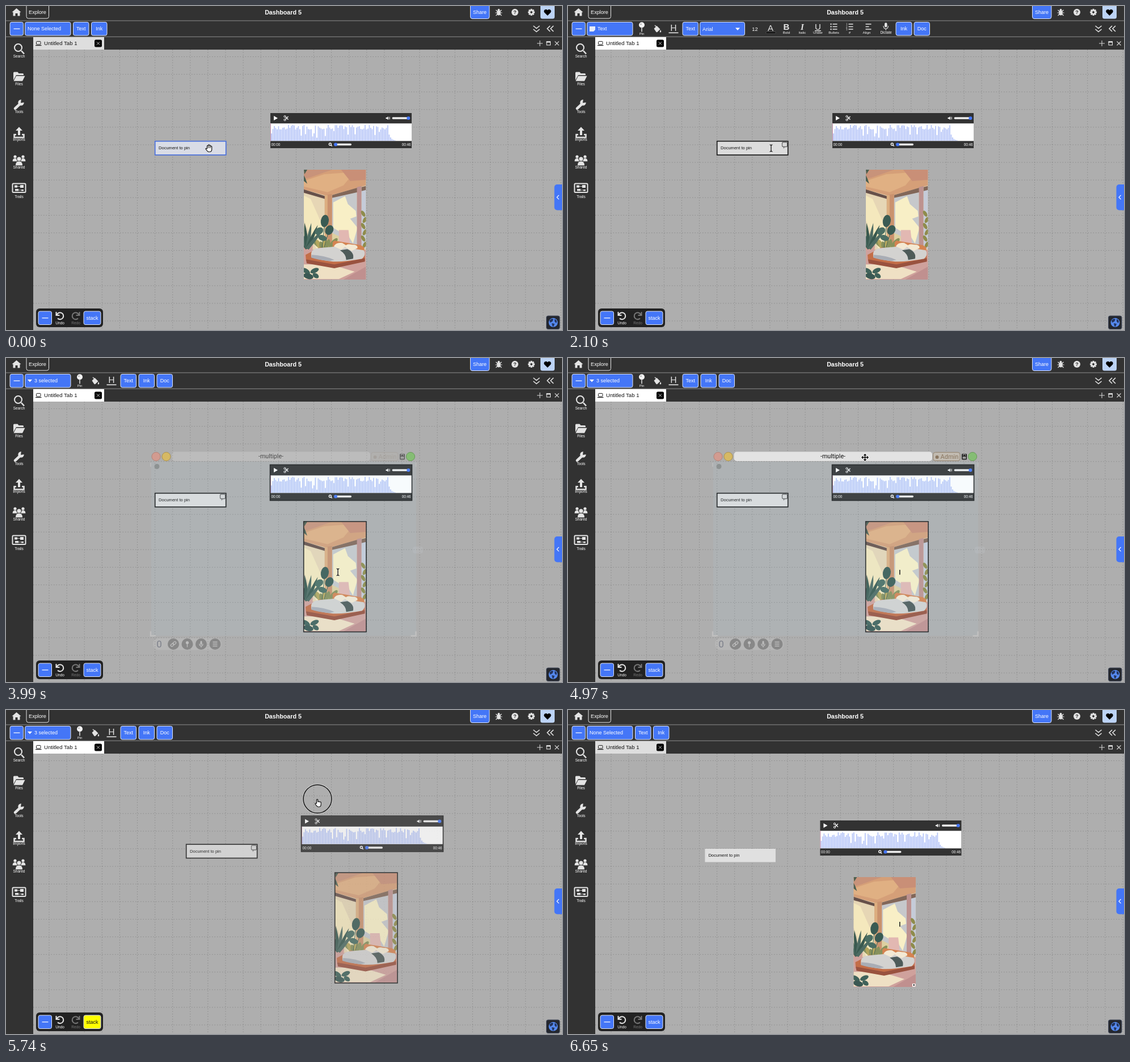
Recreate the animation shown at these times as an HTML page. Size 980 px wide and 572 px high, loop 6.79 s.

```html
<!DOCTYPE html>
<html lang="en">
<head>
<meta charset="utf-8">
<title>Dashboard</title>
<style>
html, body { margin: 0; width: 100%; height: 100%; overflow: hidden; background: #323232; }
svg { display: block; width: 980px; height: 572px; font-family: "Liberation Sans", Arial, sans-serif; }
#frame { font-family: Roboto, Arial, sans-serif; }
</style>
</head>
<body>
<svg id="stage" viewBox="0 0 980 572" xmlns="http://www.w3.org/2000/svg"></svg>
<script>
const LOOP = 6790, STEP = 70;
const DARK = '#323232', BLUE = '#4476f7', LIGHT = '#e4e4e4';

// Drawing helpers
const rect = (x, y, w, h, fill, more = '') => `<rect x="${x}" y="${y}" width="${w}" height="${h}" fill="${fill}" ${more}/>`;
const disc = (x, y, r, fill, more = '') => `<circle cx="${x}" cy="${y}" r="${r}" fill="${fill}" ${more}/>`;
const fillPath = (d, fill, more = '') => `<path d="${d}" fill="${fill}" ${more}/>`;
const line = (d, color, w = 1, more = '') => `<path d="${d}" fill="none" stroke="${color}" stroke-width="${w}" ${more}/>`;
const poly = (pts, fill) => `<polygon points="${pts}" fill="${fill}"/>`;
const oval = (x, y, rx, ry, turn, fill) => `<ellipse rx="${rx}" ry="${ry}" fill="${fill}" transform="translate(${x} ${y}) rotate(${turn})"/>`;
const text = (x, y, size, str, fill = LIGHT, more = '') => `<text x="${x}" y="${y}" font-size="${size}" fill="${fill}" ${more}>${str}</text>`;
const label = (x, y, str, fill = LIGHT, size = 6.5) => text(x, y, size, str, fill, 'text-anchor="middle"');
const group = (id, body) => `<g id="${id}">${body}</g>`;
const at = (x, y, body) => `<g transform="translate(${x} ${y})">${body}</g>`;
const button = (x, y, w, h, str, fill = BLUE, color = '#fff') =>
  rect(x + .5, y + .5, w - 1, h - 1, fill, 'rx="3" stroke="#dfe5f5"') + label(x + w / 2, y + h / 2 + 3.2, str, color, 9);
const minus = (x, y) => button(x, y, 24.5, 24.5, '') + rect(x + 7, y + 11.7, 11, 1.2, '#fff');
const caret = (x, y) => fillPath(`M${x - 4} ${y - 2}h8l-4 4.5z`, '#fff');
const noise = n => { const v = Math.sin(n * 127.1 + 7.3) * 43758.5; return v - Math.floor(v); };

function grid() {
  let d = '';
  for (let x = 76; x < 980; x += 31.1) d += `M${x.toFixed(1)} 77V572`;
  for (let y = 89.5; y < 572; y += 31.1) d += `M48 ${y.toFixed(1)}H980`;
  return rect(48, 77, 932, 495, '#aeaeae') + line(d, '#000', 1, 'stroke-dasharray="1.5 3" opacity=".2"');
}

function header() {
  const gear = [0, 45, 90, 135].map(a => rect(-1.5, -6, 3, 12, LIGHT, `transform="rotate(${a})"`)).join('');
  return rect(0, 0, 980, 77, DARK) + rect(0, 25.5, 980, 1, '#8d8d8d') + rect(0, 53.8, 980, 1, '#8d8d8d') +
    fillPath('M18.5 4l8 7h-2v6.5h-4v-4.5h-4v4.5h-4v-6.5h-2z', LIGHT) +
    rect(36, -4, 39.5, 26, DARK, 'rx="3.5" stroke="#e8e8e8"') + label(55.5, 13.7, 'Explore', '#fff', 9.1) +
    text(488.5, 14.5, 10.7, 'Dashboard 5', '#fff', 'text-anchor="middle" font-weight="bold"') +
    rect(818.5, -4, 33.5, 26.5, BLUE, 'rx="3.5" stroke="#dfe5f5"') + label(835, 13.7, 'Share', '#fff', 9) +
    at(868.5, 11, oval(0, 1, 3.2, 4.6, 0, LIGHT) + disc(0, -4, 2, LIGHT) +
      line('M-6 1H6M-5-4L-2-1M5-4L2-1M-5 6L-2 3M5 6L2 3', LIGHT, 1.2)) +
    disc(897, 11, 6, LIGHT) + text(897, 14.3, 9, '?', DARK, 'text-anchor="middle" font-weight="bold"') +
    at(926, 11, gear + disc(0, 0, 4.3, LIGHT) + disc(0, 0, 1.9, DARK)) +
    rect(942, -4, 25, 26.5, '#bcd3f5', 'rx="3.5"') +
    fillPath('M954.5 17l-5.3-5.3c-3-3.5 2-8 5.3-4.2c3.3-3.8 8.3.7 5.3 4.2z', '#000') +
    line('M929.5 35l5.5 4.5 5.5-4.5M929.5 41l5.5 4.5 5.5-4.5M959 35l-5 5 5 5M965 35l-5 5 5 5', LIGHT, 1.6);
}

function tabs() {
  return '<rect id="tab" x="48" y="55" width="125" height="22"/>' +
    rect(53.5, 62.5, 7.5, 5.5, 'none', 'stroke="#222" rx="1"') + rect(52, 69, 10.5, 1.2, '#222') +
    text(67, 69.3, 9.6, 'Untitled Tab 1', '#111') +
    rect(156, 59.5, 13, 13, '#050505', 'rx="2.5"') + line('M160 63.5l5 5m0-5l-5 5', '#ddd', .9) +
    line('M936 66h10M941 61v10M967.5 62.5l7 7m0-7l-7 7', '#d5d5d5', 1.1) +
    rect(953, 63, 6.5, 6, 'none', 'stroke="#f0f0f0"') + rect(952.5, 62.5, 7.5, 2, '#f0f0f0');
}

function sidebar() {
  const person = (x, y, r) => disc(x, y, r, LIGHT) +
    fillPath(`M${x - r * 1.7} ${y + r * 3.2}q0-${r * 2} ${r * 1.7}-${r * 2}t${r * 1.7} ${r * 2}z`, LIGHT);
  const names = [['Search', 90.5], ['Files', 139.5], ['Tools', 189], ['Imports', 238], ['Shared', 287], ['Trails', 339]];
  return rect(0, 55, 48, 517, DARK) +
    line('M27 79l5 5.5', LIGHT, 2.5) + disc(21.5, 73.5, 6.5, 'none', `stroke="${LIGHT}" stroke-width="2.1"`) +
    fillPath('M13 131V118q0-1.5 1.5-1.5h6l2 2.5h7q1.5 0 1.5 1.5v1.5H18z', LIGHT) +
    fillPath('M13.5 132.5l4.5-9h15.5l-4.5 9z', LIGHT) +
    line('M16 181l9-8.5', LIGHT, 4.5, 'stroke-linecap="round"') + disc(26.5, 170.5, 5.2, LIGHT) + fillPath('M26 171l1-7 6 0 1 6z', DARK) +
    fillPath('M23 213.5l6 6.5h-4v8h-4v-8h-4z', LIGHT) + line('M18 227H14.5v5h17v-5H28', LIGHT, 2.5) +
    person(16, 266, 2.6) + person(30, 266, 2.6) + disc(23, 270, 4.7, DARK) + person(23, 270, 3.6) +
    rect(11.5, 313.5, 23, 15.5, 'none', `rx="1.5" stroke="${LIGHT}" stroke-width="2"`) +
    rect(15, 316.5, 5, 4, LIGHT) + rect(25, 316, 6, 5, LIGHT) + rect(16, 323, 6, 3.5, LIGHT) + rect(27, 324, 4, 2.5, LIGHT) +
    line('M20 318.5h5M22 325h5', LIGHT, .8) +
    names.map(([n, y]) => label(23, y, n, '#fff')).join('');
}

function dock() {
  const turn = 'M-5.5-1A6 6 0 1 1-4 5M-6.5-6.5v6h6';
  return rect(53, 534, 118, 33, '#222', 'rx="6"') + minus(56.5, 538.5) +
    at(95, 546.5, line(turn, LIGHT, 2)) + label(95, 561.5, 'Undo', '#fff') +
    at(123, 546.5, line(turn, '#777', 2, 'transform="scale(-1 1)"')) + label(123, 561.5, 'Redo', '#777') +
    group('stackOff', button(136.5, 538.5, 31, 24.5, 'stack')) +
    group('stackOn', button(136.5, 538.5, 31, 24.5, 'stack', '#ffff00', '#111')) +
    rect(966.5, 315, 20, 45.5, BLUE, 'rx="5"') + line('M974.5 334l-3.5 3.7 3.5 3.7', '#fff', 1.2) +
    rect(952.5, 547, 23.5, 23.5, '#24272e', 'rx="3" stroke="#4b5263"') + disc(964.5, 558.8, 8, '#5589ee') +
    fillPath('M958 555l4-3 3 1-2 4-4 2zM962 560l5 1-2 5-2-1zM967 552l4 4-1 4-3-3z', '#24345c');
}

function toolbars() {
  const field = str => button(33, 28, 81.5, 24.5, '') + str;
  const common = at(130, 33.5, disc(0, 0, 5, '#f4f4f4') + disc(-1.5, -1.5, 1.3, '#aaa') + rect(-.8, 5, 1.6, 7, '#ddd')) + label(130, 51, 'Pin', '#fff', 6) +
    at(157, 40, fillPath('M-5.5 0l5-5 6 6-5 5q-1 .7-2 0z', LIGHT) + line('M-4-6l4 4', LIGHT, 1.3) + fillPath('M6 2q2.5 4 0 4.5t0-4.5z', LIGHT)) +
    text(186, 44, 15, 'H', LIGHT, 'text-anchor="middle" font-family="Lato, sans-serif"') + rect(177.5, 46.5, 17, 1.6, LIGHT) +
    button(201.5, 28, 28.5, 24.5, 'Text');
  const glyph = (x, ch, name, more) => text(x, 42, 15, ch, LIGHT, 'text-anchor="middle" ' + more) + label(x, 48.5, name, '#fff', 6.2);
  const rows = (x, name, widths, marks = '') =>
    line(widths.map((w, i) => `M${x - 2} ${32 + i * 4.5}h${w}`).join(''), LIGHT, 1.5) + marks + label(x, 48.5, name, '#fff', 6.2);
  const textTools = field(fillPath('M38 36h10v6l-3 3H38z', '#e8ecf8') + text(52, 43.2, 9, 'Text', '#fff')) + common +
    button(232, 28, 80, 24.5, '') + text(237, 43.7, 9.3, 'Arial', '#fff') + caret(299, 40.5) +
    label(329.5, 43.5, '12', '#fff', 9.3) + label(357, 44, 'A', LIGHT, 15) + rect(349, 46, 17, 2.6, '#000', 'stroke="#777" stroke-width=".5"') +
    glyph(385, 'B', 'Bold', 'font-weight="bold"') +
    glyph(413, 'I', 'Italic', 'font-style="italic" font-weight="bold" font-family="Liberation Serif, serif"') +
    glyph(440.5, 'U', 'Under', 'text-decoration="underline"') +
    rows(468.5, 'Bullets', [8, 8, 8], [32, 36.5, 41].map(y => disc(463.5, y, 1.2, LIGHT)).join('')) +
    rows(496.5, '#', [8, 8, 8], [1, 2, 3].map(n => text(490, 29.5 + n * 4.5, 4.5, n)).join('')) +
    rows(526.5, 'Align', [10, 6, 10]) +
    rect(558, 29.5, 4.5, 8, LIGHT, 'rx="2.2"') + line('M556 35q0 5 4.2 5t4.2-5M560.2 40v3', LIGHT, 1.1) + label(560.5, 48.5, 'Dictate', '#fff') +
    button(577.5, 28, 29, 24.5, 'Ink') + button(609.5, 28, 28.5, 24.5, 'Doc');
  return minus(6.5, 28) +
    group('barNone', field(text(38, 43.2, 9, 'None Selected', '#fff')) + button(118, 28, 28.5, 24.5, 'Text') + button(150, 28, 28.5, 24.5, 'Ink')) +
    group('barText', textTools) +
    group('barMulti', field(caret(42, 40) + '<text id="count" x="50" y="43.2" font-size="9" fill="#fff"></text>') + common +
      button(233.5, 28, 28.5, 24.5, 'Ink') + button(265.5, 28, 28.5, 24.5, 'Doc'));
}

function note() {
  return '<rect id="noteBox" x="263" y="239" width="124.5" height="23.5"/>' +
    text(269, 253.3, 7.55, 'Document to pin', '#111') +
    group('noteMark', fillPath('M379.5 240.5h5q2 0 2 2v4q0 2-2 2h-3l-1 1.5v-1.5h-1q-2 0-2-2v-4q0-2 2-2z', '#d8d8d8', 'stroke="#6a6a6a" stroke-width="1.3"')) +
    '<rect id="noteEdge" x="262.7" y="238.7" width="125" height="24.3" fill="none" stroke-width="1.7"/>';
}

function audio() {
  let bars = '';
  for (let i = 0; i < 88; i++) {
    const dip = noise(i * 3) > .9 ? 10 + 8 * noise(i) : 0;
    const h = i > 82 ? 11 * Math.pow(.55, i - 83) : i ? 20 + 9 * noise(i + .5) ** 1.5 - dip : 13;
    bars += `M${467 + i * 2.5} 238v-${h.toFixed(1)}h1.8V238z`;
  }
  const slider = (x, y, w, knob) => rect(x, y - 1.7, w, 3.4, '#f0f0f0', 'rx="1.7"') + disc(knob, y, 3, BLUE);
  return rect(466, 189, 249, 62, DARK) + rect(466, 207.3, 249, 31, '#fff') + fillPath(bars, '#b7c6f8') + rect(466, 207.3, 1, 31, '#d49ab4') +
    fillPath('M472 194l7 4-7 4z', '#fff') +
    line('M491.5 194.5l6 6M491.5 201l6-6', '#fff', 1.2) + disc(491.5, 195, 1.6, DARK, 'stroke="#fff"') + disc(491.5, 201, 1.6, DARK, 'stroke="#fff"') +
    fillPath('M669.5 197h1.5l2.5-2v6l-2.5-2h-1.5z', '#fff') + line('M674.5 196q1 2 0 4M676 195.5q1.3 2.5 0 5', '#fff', .7) +
    slider(680.5, 198, 31.5, 709.3) + slider(579, 244.5, 30, 581) +
    disc(571.3, 244, 2, 'none', 'stroke="#fff" stroke-width="1.3"') + line('M572.7 245.5l2 2', '#fff', 1.3) +
    text(467.5, 247, 6.3, '00:00', '#fff') + text(713.5, 247, 6.3, '00:46', '#fff', 'text-anchor="end"') +
    group('scrub', rect(-.5, 207.3, 1, 31, '#8b9bd4') + '<text id="stamp" y="235.2" font-size="8.2" fill="#333" text-anchor="middle"></text>') +
    '<rect id="audioEdge" x="465.5" y="188.5" width="250" height="63" fill="none" stroke-width="1.6"/>';
}

function picture() {
  const repeat = (n, draw) => Array.from({ length: n }, (_, i) => draw(i)).join('');
  const spikes = repeat(6, i => `<path d="M-3 0Q-4-26 0-46Q4-26 3 0z" fill="${i % 2 ? '#4d6b62' : '#39594f'}" transform="translate(6 140) rotate(${i * 15 - 36})"/>`);
  const walls = rect(0, 0, 110, 195, '#e3d3b3') +
    poly('0,42 37,54 37,140 0,140', '#e6d6b5') + poly('0,46 12,52 37,108 37,140 22,140 0,90', '#f4e8bd') +
    poly('50,48 94,38 94,140 50,140', '#c6c8cb') + poly('102,34 110,30 110,140 102,140', '#c5cbd8') +
    poly('52,58 73,47 78,61 92,73 93,83 82,87 95,103 87,131 75,111 65,111 52,103', '#f8efc6') +
    poly('62,107 79,107 82,134 62,134', '#e2b8b2') + poly('50,112 62,118 62,136 50,145', '#ddd0a0');
  const ceiling = poly('0,0 110,0 110,28 42,47 0,35', '#d59f78') + poly('0,20 36,8 90,4 70,28 42,40 0,30', '#e0b083') +
    poly('0,0 50,0 10,14 0,16', '#c8937a') + poly('66,0 110,0 110,18 82,20', '#c98f77') +
    poly('0,35 38,47 38,52 0,41', '#66504a') + poly('50,45 95,32 95,40 50,50', '#826759') + poly('102,31 110,29 110,36 102,38', '#826759') +
    poly('37,45 50,43 50,142 37,142', '#ca926e') + poly('37,45 42,45 42,140 37,138', '#dcae80') + poly('94,31 102,29 102,146 94,146', '#bd9290');
  const plants = repeat(6, i => oval(105 + i % 2 * 3, 78 + i * 11, 3, 6, i % 2 ? 30 : -30, '#8f8c4c')) +
    repeat(7, i => oval(22 + i * 5, 130 + i % 3 * 4, 4, 11, i * 14 - 42, i % 2 ? '#b3a65e' : '#87915c')) +
    poly('0,132 16,134 15,150 0,151', '#d2a198') + spikes +
    line('M37 95L32 140M45 106L36 138', '#3f6056', 1) + oval(37, 91, 7, 11, 10, '#3a5b53') + oval(27, 109, 8, 6, -35, '#4a6e63') + oval(45, 107, 7, 9, 30, '#3a5b53') + oval(33, 121, 8, 5, 20, '#4a6e63');
  const bed = poly('0,142 110,142 110,195 0,195', '#cfa19c') + poly('0,168 48,168 90,181 62,194 0,194', '#efe0c4') + poly('70,195 110,172 110,195', '#c0908f') +
    poly('51,129 54,126 101,134 107,138 107,150 51,140', '#d58351') +
    poly('3,151 28,138 108,148 108,162 54,174 4,162', '#c36e48') + poly('4,159 54,168 108,157 108,163 54,175 5,166', '#99523f') +
    fillPath('M13 148Q14 141 27 139L62 136L106 143Q111 151 103 158Q70 164 52 163Q30 161 13 155z', '#d3d2d0') +
    fillPath('M14 151Q36 152 54 160L45 162Q24 160 13 156z', '#a9adb5') +
    fillPath('M53 136q5-8 15-6l8 5-10 7zM72 137q4-7 13-4q11 0 10 6l-10 5z', '#f3e9d3') +
    fillPath('M64 143l13-2q13 6 10 17l-12 2q0-10-11-17z', '#4e5b59');
  const leaves = oval(4, 180, 8, 4, 35, '#40625a') + oval(19, 179, 8, 4, -25, '#40625a') + oval(8, 189, 9, 5, 15, '#3a5853') + oval(21, 188, 6, 4, 35, '#40625a') +
    poly('0,0 6,0 1,8', '#4b5f50') + poly('0,10 3,16 6,25 0,20', '#4b5f50');
  return `<svg x="525" y="289" width="109.5" height="194" viewBox="0 0 110 195" preserveAspectRatio="none">${walls + ceiling + plants + bed + leaves}</svg>` +
    group('badge', rect(628.5, 477, 5.5, 5.5, '#fff') + rect(630.3, 478, 2, 3, '#222')) +
    '<rect id="picEdge" x="524.7" y="288.7" width="110.3" height="194.8" fill="none" stroke-width="1.6"/>';
}

function frame() {
  const link = rect(-5.5, -2, 6, 4, 'none', 'rx="2"') + rect(-.5, -2, 6, 4, 'none', 'rx="2"');
  const buttons = rect(259, 274, 121, 21, '#fff', 'rx="10" opacity=".1"') + label(270, 290, '0', '#7d808b', 17) +
    [295, 319.5, 344, 368.5].map(x => disc(x, 284.5, 10, '#888')).join('') +
    `<g fill="none" stroke="#bebebe" stroke-width="1.3"><g transform="translate(295 284.5) rotate(-40)">${link}</g>` +
    '<path d="M319.5 284v6M341 284q0 4 3 4t3-4M344 288v2.5M364.5 281h8M364.5 284.5h8M364.5 288h8"/></g>' +
    disc(319.5, 282, 2.6, '#bebebe') + rect(342.5, 279, 3, 7, '#bebebe', 'rx="1.5"');
  return '<rect id="tint" x="256" y="183" width="467" fill="#add8e6" opacity=".1"/>' +
    line('M255 192v-7M722.5 192v-7', '#bababa', 2) +
    disc(264.5, 174, 7.6, '#d29b90', 'stroke="#b28479"') + disc(282.5, 174, 7.6, '#d6b964', 'stroke="#ad9350"') + disc(713, 174, 7.6, '#85bd74', 'stroke="#6a9a5b"') +
    group('titleBar', rect(292.5, 165.5, 349.5, 16.5, '#e3e3e3', 'rx="5"')) +
    group('titleText', label(467, 177, '-multiple-', '#111', 10.7)) +
    group('role', rect(643.5, 166.5, 47.5, 15, '#c1bab0', 'rx="4" stroke="#93836f"') + disc(650.5, 175, 3, '#8a7761') + text(656.5, 178.3, 11, 'Admin', '#8a7761')) +
    group('lock', rect(694, 169, 9, 10.5, '#222', 'rx="1.5"') + rect(695.5, 174, 6, 4, '#999') + line('M696.5 172.5v-2.5h4v2.5', '#aaa', 1)) +
    group('dot', disc(266, 191.5, 4.5, '#8d9292') + rect(717, 333, 18, 12, '#c9cdd2', 'rx="4" opacity=".2"')) +
    group('foot', line('M255 262v8h9M722.5 262v8h-9', '#c0c0c0', 2.5) + group('buttons', buttons));
}

function cursors() {
  const ink = 'stroke="#111" stroke-width="1.2" stroke-linejoin="round"';
  const cross = 'M0-5.5V5.5M-5.5 0H5.5M-2-3.5L0-5.5L2-3.5M-2 3.5L0 5.5L2 3.5M-3.5-2L-5.5 0L-3.5 2M3.5-2L5.5 0L3.5 2';
  const beam = 'M-2.5-6Q0-6 0-4.5V4.5Q0 6-2.5 6M2.5-6Q0-6 0-4.5M0 4.5Q0 6 2.5 6';
  return group('hand', fillPath('M-3.5 1V-4q1-1.5 2 0v-1.5q1-1.5 2 0v1q1-1.5 2 0v1.5q1.3-1.5 2.2 0V2q0 4.5-4 4.5h-2Q-3 5.5-6 1.5q0-2 2.5-.5z', '#fff', ink) +
      line('M-1.5-4v4M.5-4.5V0M2.5-3.5V0', '#111', .8)) +
    group('beam', line(beam, '#eee', 2.6, 'opacity=".6"') + line(beam, '#000', 1.2)) +
    group('arrow', fillPath('M0 0V12l2.8-2.6 2 4.4 2-.9-2-4.2H8.5z', '#111', 'stroke="#eee" stroke-width=".9"')) +
    group('move', line(cross, '#fff', 3) + line(cross, '#000', 1.4)) +
    group('press', disc(0, 0, 25.8, 'none', 'stroke="#fff" stroke-width="1.2" opacity=".7"') + disc(0, 0, 25, 'none', 'stroke="#111" stroke-width="1.5"') +
      fillPath('M-1.5 8V1.5q1-1.7 2.2 0V5q1.2-1 2 .2q1.2-.7 2 .3q1.5-.3 1.5 1V9.5q0 4.5-3.7 4.5h-1.5Q-1.5 13-4 8.7q0-1.7 2.5-.7z', '#fff', ink));
}

document.getElementById('stage').innerHTML =
  grid() + group('docs', group('note', note()) + group('audio', audio()) + group('pic', picture())) + group('frame', frame()) +
  header() + tabs() + sidebar() + toolbars() + dock() + group('caret', rect(584, 374, 1.6, 8.5, '#222')) + group('cursor', cursors());

const el = {};
document.querySelectorAll('#stage [id]').forEach(e => el[e.id] = e);
const set = (id, props) => { for (const k in props) el[id].setAttribute(k, props[k]); };
const show = (id, on) => set(id, { display: on ? 'inline' : 'none' });

// Keys: time, x, y
const POINTER = [[0, 358, 251], [2100, 358, 251], [2520, 518, 226], [3220, 518, 226], [3360, 532, 247], [3850, 585, 378], [4340, 585, 378],
  [4970, 523.5, 175.5], [5110, 523, 174], [5390, 500, 178], [5600, 582, 164], [5740, 549, 157], [5880, 506, 173], [6020, 493, 180], [6230, 510, 179], [6440, 502, 181]];
const DRAG = [[0, 0, 0], [5110, 0, 0], [5390, -18, 3], [5670, 62, -2], [5740, 55, -1.5], [5880, 5, 2], [6020, -25, 4], [6230, -10, 5], [6440, -21.6, 6]];
// Pointer shape until each time
const SHAPES = [[1470, 'hand'], [2170, 'beam'], [3710, 'arrow'], [4410, 'beam'], [4900, 'arrow'], [5110, 'move'], [6440, 'press']];
// Title parts and their opacity while the pointer is away
const DIMMED = [['titleBar', .25], ['titleText', .65], ['role', .2], ['lock', .55]];

const ramp = (t, a, b) => Math.min(1, Math.max(0, (t - a) / (b - a)));
function along(keys, t) {
  const i = keys.findIndex(k => k[0] > t);
  if (i < 0) return keys[keys.length - 1].slice(1);
  const [a, b] = [keys[i - 1], keys[i]], u = ramp(t, a[0], b[0]);
  return [a[1] + (b[1] - a[1]) * u, a[2] + (b[2] - a[2]) * u];
}

function render(t) {
  const picked = t < 1470 || t >= 6440 ? 0 : t < 2660 ? 1 : t < 3920 ? 2 : 3;
  const dragging = t >= 5110 && t < 6440;
  const [x, y] = along(POINTER, t), [dx, dy] = along(DRAG, t);

  show('barNone', picked == 0);
  show('barText', picked == 1);
  show('barMulti', picked > 1);
  el.count.textContent = picked + ' selected';
  set('tab', { fill: picked ? '#fff' : '#dedede' });
  const stacked = t >= 5390 && t < 6510;
  show('stackOn', stacked);
  show('stackOff', !stacked);

  ['note', 'audio', 'pic'].forEach(id => set(id, { opacity: dragging ? .8 : 1 }));
  set('docs', { transform: `translate(${dx} ${dy})` });
  const overAudio = x > 466 && x < 715 && y > 189 && y < 251;
  const overPic = x > 525 && x < 634 && y > 289 && y < 483;
  const edge = (id, on, hover) => set(id, { stroke: on ? '#1c1c1c' : hover ? '#4a70dc' : 'none' });
  edge('noteEdge', picked > 0, t < 1470);
  edge('audioEdge', picked > 1, overAudio);
  edge('picEdge', picked > 2, overPic);
  set('noteBox', { fill: picked ? '#dcdcdc' : t < 1470 ? '#d9dce6' : '#e0e0e0' });
  show('noteMark', picked > 0);
  show('badge', t >= 6510);

  const sx = Math.min(x, 521);
  show('scrub', x > 466 && t > 2300 && t < 3500);
  set('scrub', { transform: `translate(${sx} 0)` });
  el.stamp.textContent = '00:' + String(Math.max(0, Math.floor((sx - 466) / 249 * 46))).padStart(2, '0');

  show('frame', picked > 1 && !dragging);
  set('frame', { opacity: .3 + .7 * ramp(t, 2660, 2940) });
  const tall = picked == 3 ? 220.5 : 0, near = ramp(t, 4690, 4900);
  set('tint', { height: 87 + tall });
  set('foot', { transform: `translate(0 ${tall})` });
  show('buttons', t >= 3220);
  show('dot', picked == 3);
  DIMMED.forEach(([id, dim]) => set(id, { opacity: dim + (1 - dim) * near }));

  const shape = (SHAPES.find(s => t < s[0]) || [])[1];
  SHAPES.forEach(s => show(s[1], s[1] == shape));
  set('cursor', { transform: `translate(${x} ${y})` });
  show('caret', t >= 4410 && t < 5110 || t >= 6440);
}

const start = performance.now();
function tick() {
  render(Math.floor((performance.now() - start) % LOOP / STEP) * STEP);
  requestAnimationFrame(tick);
}
tick();
</script>
</body>
</html>
```
